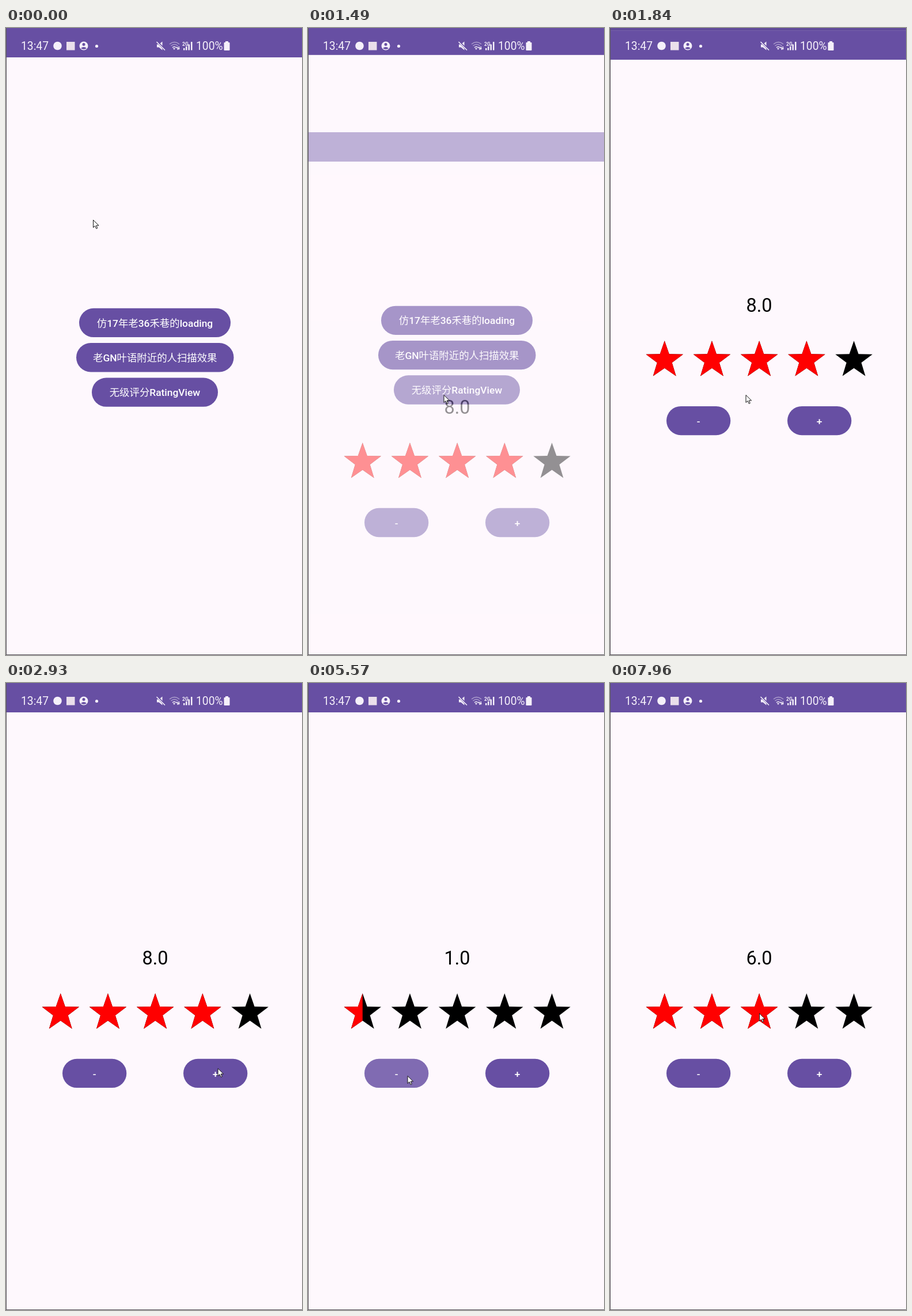
Recreate the animation shown at these times as an HTML page. Size 514 by 1089 pixels, loop 8000 ms.

```html
<!DOCTYPE html>
<html lang="zh-CN">
<head>
<meta charset="utf-8">
<style>
html, body { margin: 0; width: 100%; height: 100%; overflow: hidden; background: #fef8fd; }
svg { display: block; width: 100%; height: 100%; }
text { font-family: Roboto, "Noto Sans CJK SC", "Noto Sans CJK", sans-serif; }
.label { font-size: 17.4px; font-weight: 500; fill: #fff; text-anchor: middle; }
.status text { font-size: 19.3px; }
</style>
</head>
<body>
<svg viewBox="0 0 514 1089" preserveAspectRatio="none">
  <rect width="514" height="1089" fill="#fef8fd"/>
  <g id="menu">
    <rect width="514" height="1200" fill="#fef8fd"/>
    <rect width="514" height="51" fill="#674fa3"/>
  </g>
  <rect id="dim" width="514" height="1089" opacity="0"/>
  <g id="rating">
    <rect width="514" height="1089" fill="#fef8fd"/>
    <rect width="514" height="51" fill="#674fa3"/>
    <text id="score" x="259" y="489" font-size="32.5" text-anchor="middle">8.0</text>
  </g>
  <g class="status" fill="#f5f0fa">
    <text x="26" y="38">13:47</text>
    <circle cx="89.5" cy="31" r="7.3"/>
    <rect x="105" y="24" width="14.5" height="14.5" fill="#eadfeb"/>
    <circle cx="135" cy="31" r="7.5"/>
    <g fill="#674fa3"><circle cx="135" cy="28.6" r="2.5"/><path d="M130 35.2q5-4.6 10 0q-5 3.6-10 0z"/></g>
    <circle cx="157.5" cy="31.5" r="2.6"/>
    <path d="M262 28.5h3.5l6-5v15l-6-5h-3.5z"/>
    <path d="M262 23.5l14 14.5" stroke="#674fa3" stroke-width="3.5"/>
    <path d="M261.5 24l14.5 14.5" stroke="#f5f0fa" stroke-width="1.6"/>
    <g fill="none" stroke="#f5f0fa" stroke-width="1.6">
      <path d="M284 28q8.500-7 17 0M286.500 31q6-5 12 0" opacity=".5"/>
      <path d="M289 34q3.500-3 6 0"/>
    </g>
    <path d="M290 35h4l-2 3zM295 35l2-3 2 3v3h-1.500v-3zM298.500 35h1v-3h1.500v3h1l-1.700 3z"/>
    <text x="306" y="31" style="font-size:8.500px;font-weight:700">2G</text>
    <path d="M308 35h2.500v3.500h-2.500zM312 32h2.500v6.500h-2.500zM316.500 28.500h2.500v10h-2.500zM321 24h2.500v14.500h-2.500z"/>
    <text x="330" y="38">100%</text>
    <path d="M381 23h5v2h1.500q1 0 1 1v12q0 1-1 1h-8q-1 0-1-1v-12q0-1 1-1h1.500z"/>
  </g>
  <path d="M.5 0V1089M0 1088.5H514" stroke="#59545c" fill="none"/>
  <path id="cursor" d="M0 .5V13.500L3 10.700 5.300 15.500 7.300 14.600 5.200 10H9.600z" fill="#fff" stroke="#111" stroke-width="1"/>
</svg>
<script>
const LOOP = 8000, NS = 'http://www.w3.org/2000/svg';
const $ = id => document.getElementById(id);
const clamp = v => Math.max(0, Math.min(1, v));

function add(parent, tag, attrs, text) {
  const el = document.createElementNS(NS, tag);
  for (const k in attrs) el.setAttribute(k, attrs[k]);
  if (text) el.textContent = text;
  parent.appendChild(el);
  return el;
}

// Pill button; returns the highlight layer shown while it is pressed.
function button(parent, x, y, width, label) {
  const box = { x, y, width, height: 50.3, rx: 25.1 };
  add(parent, 'rect', { ...box, fill: '#674fa3' });
  const glow = add(parent, 'rect', { ...box, fill: '#fff', opacity: 0 });
  add(parent, 'text', { class: 'label', x: x + width / 2, y: y + 31.7 }, label);
  return glow;
}

function starPath(cx, cy, r) {
  const pts = Array.from({ length: 10 }, (_, i) => {
    const a = i * Math.PI / 5, d = i % 2 ? r * 0.4 : r;
    return (cx + d * Math.sin(a)).toFixed(2) + ' ' + (cy - d * Math.cos(a)).toFixed(2);
  });
  return 'M' + pts.join('L') + 'z';
}

const menu = $('menu'), rating = $('rating');
button(menu, 127, 486.8, 263, '仿17年老36禾巷的loading');
button(menu, 122, 547.1, 273.5, '老GN叶语附近的人扫描效果');
const openGlow = button(menu, 149, 607.5, 219, '无级评分RatingView');
const minusGlow = button(rating, 98, 652.8, 111.3, '-');
const plusGlow = button(rating, 308, 652.8, 111.3, '+');

const STAR_W = 64.5, STAR_GAP = 82.2, STAR_X = 62.5;
const fills = [0, 1, 2, 3, 4].map(i => {
  const left = STAR_X + i * STAR_GAP, d = starPath(left + STAR_W / 2, 573, 33.9);
  add(rating, 'path', { d });
  const clip = add(rating, 'clipPath', { id: 'fill' + i });
  const rect = add(clip, 'rect', { x: left, y: 530, width: STAR_W, height: 80 });
  add(rating, 'path', { d, fill: '#f00', 'clip-path': `url(#fill${i})` });
  return rect;
});

// time, x, y of the pointer tip
const path = [
  [0, 151.5, 333], [60, 151.5, 333], [460, 458, 713], [830, 246, 641], [1010, 236, 637],
  [2120, 236, 637], [2560, 436, 650], [2920, 368, 669], [4010, 368, 669], [4430, 173, 682],
  [5700, 173, 682], [5960, 186, 586], [6000, 186, 586], [6170, 428, 584], [6300, 328, 595],
  [6660, 328, 595], [7180, 167, 577], [7380, 167, 577], [7660, 259.5, 573.5], [8000, 259.5, 573.5]
];

// time, value
const scores = [[0, 8], [3350, 9], [3710, 10], [4550, 9], [4730, 8]];
for (let v = 7; v >= 0; v--) scores.push([4850 + (7 - v) * 110, v]);
scores.push([5990, 4], [6460, 8], [7360, 4], [7955, 6]);

function pointer(t) {
  let i = 1;
  while (i < path.length - 1 && path[i][0] < t) i++;
  const [t0, x0, y0] = path[i - 1], [t1, x1, y1] = path[i];
  const p = clamp((t - t0) / (t1 - t0)), e = p * p * (3 - 2 * p);
  return [x0 + (x1 - x0) * e, y0 + (y1 - y0) * e];
}

const press = (t, from, to) => 0.17 * Math.min(clamp((t - from) / 80), clamp((to + 180 - t) / 180));

function draw(t) {
  const [x, y] = pointer(t);
  $('cursor').setAttribute('transform', `translate(${x} ${y})`);

  // The rating page slides up and fades in over the menu.
  const open = t >= 1480, s = Math.max(0, t - 1490);
  const offset = s > 500 ? 0 : 183 * Math.exp(-s / 92.5);
  const shift = open ? 4 + 21 * clamp(s / 120) : 0;
  menu.setAttribute('transform', `translate(0 ${-shift})`);
  $('dim').setAttribute('opacity', open ? 0.055 * clamp(s / 120) : 0);
  rating.setAttribute('transform', `translate(0 ${offset})`);
  rating.setAttribute('opacity', open ? 0.41 + 0.59 * clamp(s / 120) : 0);

  openGlow.setAttribute('opacity', press(t, 1310, 1600));
  plusGlow.setAttribute('opacity', Math.max(press(t, 3160, 3380), press(t, 3540, 3740)));
  minusGlow.setAttribute('opacity', press(t, 4490, 5560));

  let score = 8;
  for (const [at, v] of scores) if (t >= at) score = v;
  $('score').textContent = score.toFixed(1);
  fills.forEach((r, i) => r.setAttribute('width', STAR_W * clamp(score / 2 - i)));
}

const start = performance.now();
function tick() {
  draw((performance.now() - start) % LOOP);
  requestAnimationFrame(tick);
}
tick();
</script>
</body>
</html>
```
